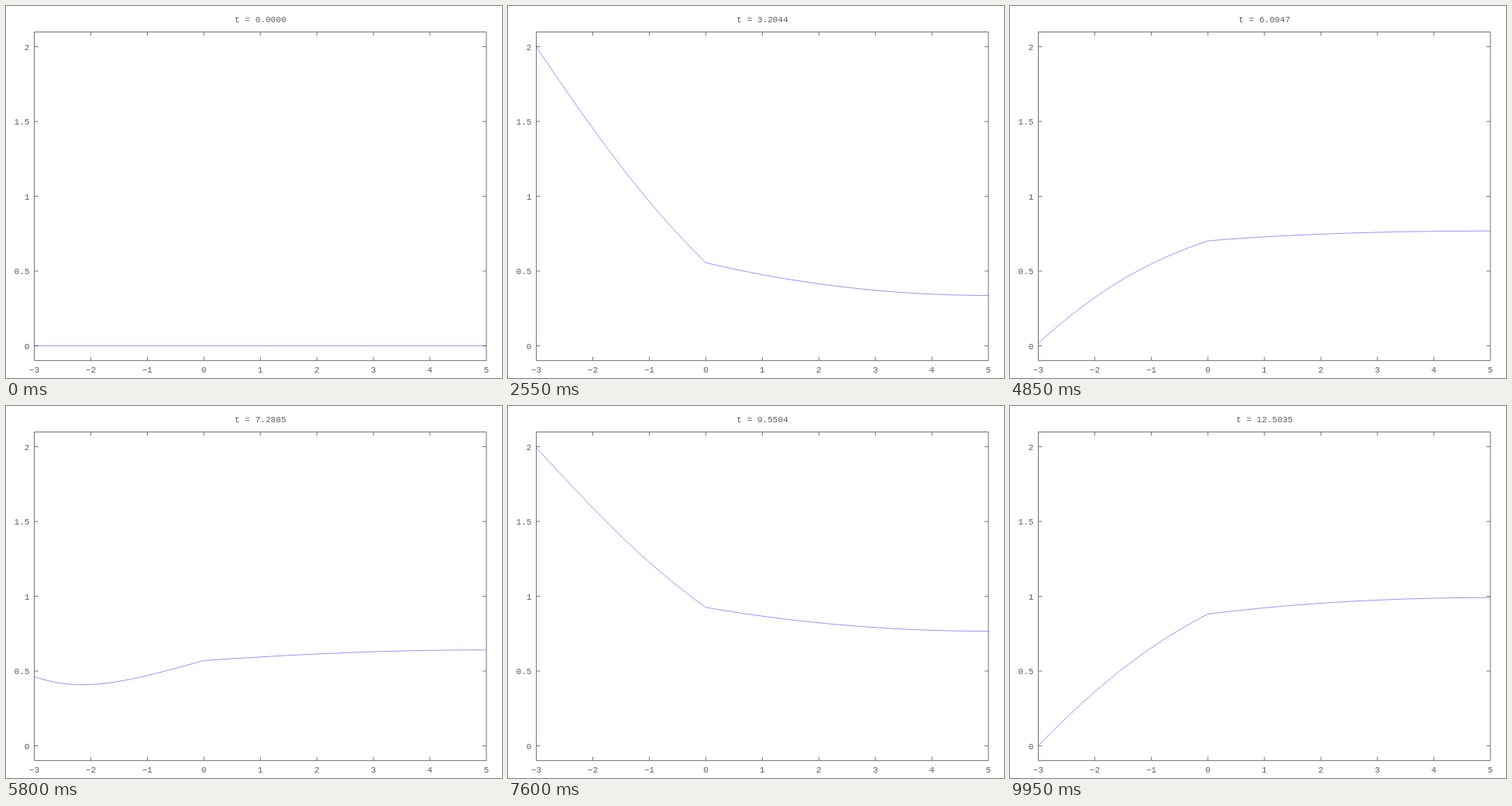
Animation of 640x480 px, one loop 10 s. Source, as an HTML page:

```html
<!DOCTYPE html>
<html lang="en">
<head>
<meta charset="utf-8">
<title>Heat flow through two layers</title>
<style>
  html, body { margin: 0; width: 100%; height: 100%; overflow: hidden; background: #fff; }
  svg { display: block; }
  text { font: 11.1px "Liberation Mono", "Courier New", monospace; fill: #5c5c5c; }
  .axes { fill: none; stroke: #747474; stroke-width: 1; }
  .curve { fill: none; stroke: #00f; stroke-width: .42; stroke-linejoin: round; }
</style>
</head>
<body>
<svg width="640" height="480" viewBox="0 0 640 480">
  <path class="axes" id="axes"></path>
  <g id="labels"></g>
  <text id="title" x="328.3" y="20.6" text-anchor="middle"></text>
  <path class="curve" id="curve"></path>
</svg>
<script>
const FRAMES = 200, FRAME_MS = 50, STEP = 4 * Math.PI / FRAMES;
const BOX = { left: 36.5, top: 33.5, right: 619.9, bottom: 457.6 };
const px = x => BOX.left + (x + 3) * 72.92;
const py = u => 438.5 - u * 193;
const byId = id => document.getElementById(id);

function drawAxes() {
  const { left, top, right, bottom } = BOX, tick = 5;
  let d = `M${left} ${top}H${right}V${bottom}H${left}Z`;
  let labels = '';
  const label = (x, y, value, anchor) => {
    labels += `<text x="${x}" y="${y}" text-anchor="${anchor}">${String(value).replace('-', '\u2212')}</text>`;
  };
  for (let x = -3; x <= 5; x++) {
    if (x > -3 && x < 5) d += `M${px(x)} ${top}v${tick}M${px(x)} ${bottom}v${-tick}`;
    label(px(x), 472.8, x, 'middle');
  }
  for (let u = 0; u <= 2; u += .5) {
    d += `M${left} ${py(u)}h${tick}M${right} ${py(u)}h${-tick}`;
    label(30.5, py(u) + 4, u, 'end');
  }
  byId('axes').setAttribute('d', d);
  byId('labels').innerHTML = labels;
}

// Heat equation on [-3, 5], one implicit Euler step per frame:
// driven left end, two layers joined at 0, insulated right end.
function solve() {
  const dx = .1, N = 80, JOIN = 30;
  const layers = [{ k: 3.75, c: 1 }, { k: 15.49, c: .968 }];
  const cells = Array.from({ length: N }, (_, i) => layers[i < JOIN ? 0 : 1]);
  const cond = i => i < N ? cells[i].k / dx : 0;
  const mass = i => dx / 2 * (cells[i - 1].c + (i < N ? cells[i].c : 0)) / STEP;
  const u = new Array(N + 1).fill(0), upper = [0];
  const paths = [];
  for (let f = 0; f < FRAMES; f++) {
    u[0] = 1 - Math.cos(f * STEP);
    for (let i = 1; i <= N; i++) {
      const m = mass(i), west = cond(i - 1), east = cond(i);
      const pivot = m + west + east - west * upper[i - 1];
      upper[i] = east / pivot;
      u[i] = (m * u[i] + west * u[i - 1]) / pivot;
    }
    for (let i = N - 1; i > 0; i--) u[i] += upper[i] * u[i + 1];
    paths.push('M' + u.map((v, i) => `${px(i * dx - 3).toFixed(2)} ${py(v).toFixed(2)}`).join('L'));
  }
  return paths;
}

drawAxes();
const paths = solve();
const curve = byId('curve'), title = byId('title');
let shown = -1;

function render(now) {
  const f = Math.floor(Math.max(0, now - start) / FRAME_MS) % FRAMES;
  if (f !== shown) {
    shown = f;
    curve.setAttribute('d', paths[f]);
    title.textContent = `t = ${(f * STEP).toFixed(4)}`;
  }
  requestAnimationFrame(render);
}

const start = performance.now();
render(start);
</script>
</body>
</html>
```
